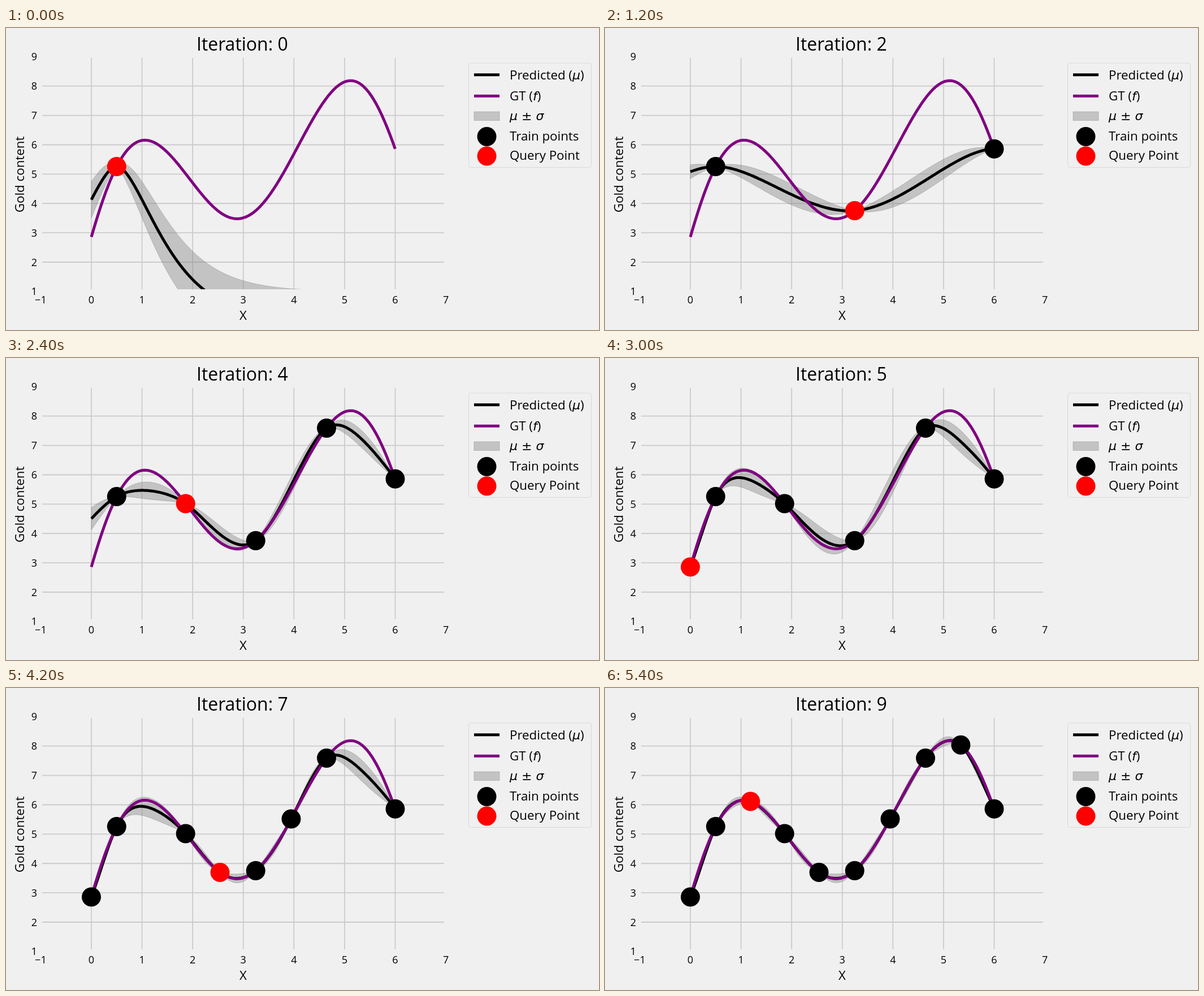
Animation of 1049x534 px, one loop 6000 ms. Source, as an HTML page:

```html
<!DOCTYPE html>
<html lang="en">
<head>
<meta charset="utf-8">
<title>Gaussian process active learning</title>
<style>
  html, body { margin: 0; width: 100%; height: 100%; overflow: hidden; background: #f0f0f0; }
  svg { display: block; width: 1049px; height: 534px; }
  text { font-family: "Open Sans", "Noto Sans", sans-serif; font-size: 22.3px; }
  .tick { font-size: 18px; }
  .title { font-size: 32px; }
  .math { font-family: "DejaVu Sans", sans-serif; font-style: italic; font-size: 22px; }
  .grid { stroke: #cbcbcb; stroke-width: 1.8; }
  .curve { fill: none; stroke-width: 5; stroke-linejoin: round; }
  .band { fill: #808080; stroke: #808080; stroke-width: 1; opacity: 1; fill-opacity: .4; stroke-opacity: .4; }
</style>
</head>
<body>
<svg viewBox="0 0 1049 534">
  <clipPath id="area"><rect x="64" y="53" width="711" height="409"/></clipPath>
  <g id="axes"></g>
  <g clip-path="url(#area)">
    <path id="band" class="band"/>
    <path id="mean" class="curve" stroke="#000"/>
    <path id="truth" class="curve" stroke="#800080"/>
  </g>
  <g id="dots"></g>
  <text id="title" class="title" x="337" y="40"></text>
  <text x="419.5" y="516" text-anchor="middle">X</text>
  <text transform="translate(31.5 259) rotate(-90)" text-anchor="middle">Gold content</text>

  <rect x="818.5" y="62" width="217" height="184.5" rx="4" fill="#f0f0f0" stroke="#d9d9d9"/>
  <path class="curve" stroke="#000" d="M828 82.7h45"/>
  <path class="curve" stroke="#800080" d="M828 120.2h45"/>
  <rect class="band" x="828" y="148" width="45" height="15.5"/>
  <circle cx="850.5" cy="192" r="17"/>
  <circle cx="850.5" cy="226.5" r="17" fill="red"/>
  <text x="891" y="91">Predicted (<tspan class="math">μ</tspan>)</text>
  <text x="891" y="128">GT (<tspan class="math">f</tspan>)</text>
  <text x="891" y="163" class="math">μ <tspan font-style="normal">±</tspan> σ</text>
  <text x="891" y="199">Train points</text>
  <text x="891" y="232.5">Query Point</text>
</svg>
<script>
const STEP = 600, COUNT = 10, SAMPLES = 240;

// Queried points in order, followed by the extrema that shape the true curve.
const points = [
  [0.5, 5.258], [6, 5.859], [3.2455, 3.754], [4.644, 7.59], [1.861, 5.017],
  [0, 2.858], [3.946, 5.518], [2.54, 3.696], [5.34, 8.037], [1.187, 6.115],
  [1.07, 6.156], [2.87, 3.48], [5.11, 8.187]
];

const el = id => document.getElementById(id);
const px = x => 151 + 89.58 * x;
const py = y => 414 - 51.88 * (y - 2);
const dot = (a, b) => a.reduce((sum, v, i) => sum + v * b[i], 0);

const matern = l => d => {
  const s = Math.sqrt(3) * Math.abs(d) / l;
  return (1 + s) * Math.exp(-s);
};
const rbf = l => d => Math.exp(-d * d / (2 * l * l));

// Gaussian process regression with unit prior variance.
function fitGP(pts, kernel, jitter, base = 0) {
  const n = pts.length, xs = pts.map(p => p[0]), ys = pts.map(p => p[1] - base);
  const L = xs.map(() => Array(n).fill(0));
  for (let i = 0; i < n; i++) {
    for (let j = 0; j <= i; j++) {
      let s = kernel(xs[i] - xs[j]) + (i === j ? jitter : 0);
      for (let k = 0; k < j; k++) s -= L[i][k] * L[j][k];
      L[i][j] = i === j ? Math.sqrt(s) : s / L[j][j];
    }
  }
  const solve = b => {
    const v = [];
    for (let i = 0; i < n; i++) {
      let s = b[i];
      for (let k = 0; k < i; k++) s -= L[i][k] * v[k];
      v[i] = s / L[i][i];
    }
    return v;
  };
  const z = solve(ys), weights = Array(n);
  for (let i = n - 1; i >= 0; i--) {
    let s = z[i];
    for (let k = i + 1; k < n; k++) s -= L[k][i] * weights[k];
    weights[i] = s / L[i][i];
  }
  return {
    loss: dot(z, z) / 2 + L.reduce((sum, row, i) => sum + Math.log(row[i]), 0),
    predict(x) {
      const k = xs.map(t => kernel(x - t)), v = solve(k);
      return [base + dot(k, weights), Math.sqrt(Math.max(0, 1 - dot(v, v)))];
    }
  };
}

// Length scale by maximum likelihood, starting from 1.
function bestGP(pts) {
  let best = fitGP(pts, matern(1), 1e-10);
  for (let l = 0.3; l < 60; l *= 1.006) {
    const gp = fitGP(pts, matern(l), 1e-10);
    if (gp.loss < best.loss) best = gp;
  }
  return best;
}

const xs = Array.from({ length: SAMPLES + 1 }, (_, i) => 6 * i / SAMPLES);
const line = pts => "M" + pts.map(([x, y]) => px(x).toFixed(2) + " " + py(y).toFixed(2)).join("L");

const scenes = Array.from({ length: COUNT }, (_, n) => {
  const seen = points.slice(0, n + 1), gp = bestGP(seen);
  const rows = xs.map(x => [x, ...gp.predict(x)]);
  const upper = rows.map(([x, m, s]) => [x, m + s]);
  const lower = rows.map(([x, m, s]) => [x, m - s]).reverse();
  return {
    mean: line(rows),
    band: line(upper.concat(lower)) + "Z",
    dots: seen.map(([x, y], i) =>
      `<circle cx="${px(x)}" cy="${py(y)}" r="17" fill="${i === n ? "red" : "#000"}"/>`).join("")
  };
});

function drawAxes() {
  let out = "";
  for (let x = -1; x <= 7; x++) {
    if (x >= 0 && x <= 6) out += `<path class="grid" d="M${px(x)} 53V462"/>`;
    out += `<text class="tick" x="${px(x)}" y="486.5" text-anchor="middle">${x < 0 ? "−" + -x : x}</text>`;
  }
  for (let y = 1; y <= 9; y++) {
    if (y > 1 && y < 9) out += `<path class="grid" d="M64 ${py(y)}H775"/>`;
    out += `<text class="tick" x="55" y="${py(y) + 6.5}" text-anchor="end">${y}</text>`;
  }
  el("axes").innerHTML = out;
}

let shown = -1;
function show(n) {
  if (n === shown) return;
  shown = n;
  el("mean").setAttribute("d", scenes[n].mean);
  el("band").setAttribute("d", scenes[n].band);
  el("dots").innerHTML = scenes[n].dots;
  el("title").textContent = "Iteration: " + n;
}

drawAxes();
const truth = fitGP(points, rbf(1.3), 1e-5, 5.5);
el("truth").setAttribute("d", line(xs.map(x => [x, truth.predict(x)[0]])));

const start = performance.now();
function tick() {
  show(Math.floor((performance.now() - start) / STEP) % COUNT);
  requestAnimationFrame(tick);
}
tick();
</script>
</body>
</html>
```
